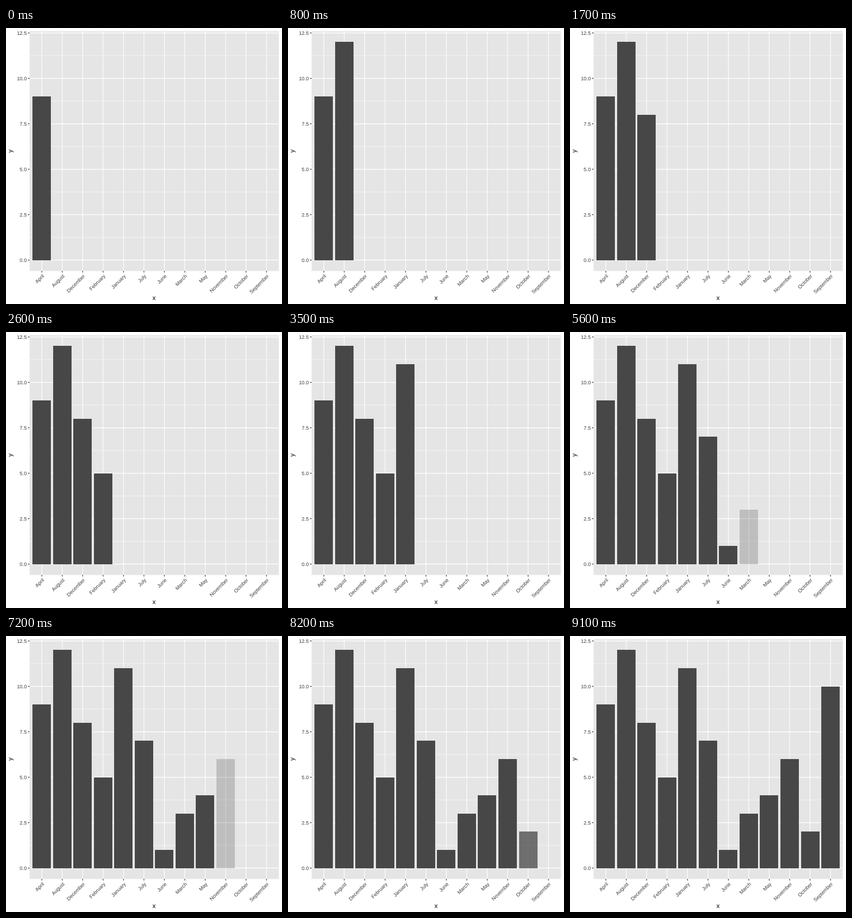
Recreate the animation shown at these times as an HTML page. Size 480x480 px, loop 10 s.

```html
<!DOCTYPE html>
<html lang="en">
<head>
<meta charset="utf-8">
<title>Bars by month</title>
<style>
  html, body { margin: 0; width: 100%; height: 100%; overflow: hidden; background: #fff; }
  svg { display: block; width: 480px; height: 480px; }
  text { font-family: "Liberation Sans", Arial, Helvetica, sans-serif; }
  .label { font-size: 8.8px; fill: #3c3c3c; text-anchor: end; }
  .title { font-size: 11px; fill: #000; text-anchor: middle; }
</style>
</head>
<body>
<svg id="chart" viewBox="0 0 480 480"></svg>
<script>
const LOOP = 10000, STEP = 100;
const LEFT = 41, RIGHT = 474.5, TOP = 5.5, BOTTOM = 422.6;
const UNIT_X = 35.52, UNIT_Y = 31.6, ZERO = 403.6, BAR_WIDTH = 32;

// month, value, time the fade starts, number of fade steps
const months = [
  ["April", 9, 0, 1],
  ["August", 12, 500, 4],
  ["December", 8, 1400, 4],
  ["February", 5, 2300, 4],
  ["January", 11, 3200, 4],
  ["July", 7, 4100, 4],
  ["June", 1, 4900, 3],
  ["March", 3, 5600, 4],
  ["May", 4, 6400, 4],
  ["November", 6, 7200, 4],
  ["October", 2, 8000, 4],
  ["September", 10, 8800, 4]
];

const chart = document.getElementById("chart");
const xAt = i => LEFT + (i + 0.6) * UNIT_X;
const yAt = v => ZERO - v * UNIT_Y;

function add(tag, attrs, content) {
  const node = document.createElementNS("http://www.w3.org/2000/svg", tag);
  for (const key in attrs) node.setAttribute(key, attrs[key]);
  if (content) node.textContent = content;
  return chart.appendChild(node);
}

function line(x1, y1, x2, y2, stroke, width) {
  add("line", { x1, y1, x2, y2, stroke, "stroke-width": width });
}

function rect(x, y, width, height, fill) {
  return add("rect", { x, y, width, height, fill });
}

function text(kind, content, x, y, angle) {
  add("text", { class: kind, transform: `translate(${x} ${y}) rotate(${angle})` }, content);
}

// panel and grid
rect(LEFT, TOP, RIGHT - LEFT, BOTTOM - TOP, "#e5e5e5");
for (let v = 1.25; v < 12.5; v += 2.5) line(LEFT, yAt(v), RIGHT, yAt(v), "#fff", 0.53);
for (let v = 0; v <= 12.5; v += 2.5) line(LEFT, yAt(v), RIGHT, yAt(v), "#fff", 1.07);
months.forEach((m, i) => line(xAt(i), TOP, xAt(i), BOTTOM, "#fff", 1.07));

// bars
const bars = months.map(([, value], i) => {
  const x = Math.round(xAt(i) - 0.45 * UNIT_X);
  const y = Math.round(yAt(value));
  return rect(x, y, BAR_WIDTH, Math.round(ZERO) - y, "#474747");
});

// axes
for (let v = 0; v <= 12.5; v += 2.5) {
  line(LEFT - 2.75, yAt(v), LEFT, yAt(v), "#242424", 1.07);
  text("label", v.toFixed(1), 36.05, yAt(v) + 3.15, 0);
}
months.forEach(([name], i) => {
  line(xAt(i), BOTTOM, xAt(i), BOTTOM + 2.75, "#242424", 1.07);
  text("label", name, xAt(i) + 4.5, 432.1, -45);
});
text("title", "x", 257.6, 472.8, 0);
text("title", "y", 11.2, 214, -90);

function draw(time) {
  const t = time % LOOP;
  months.forEach(([, , start, steps], i) => {
    const step = Math.floor((t - start) / STEP) + 1;
    bars[i].setAttribute("opacity", Math.max(0, Math.min(1, step / steps)));
  });
}

const begin = performance.now();
function tick() {
  draw(performance.now() - begin);
  requestAnimationFrame(tick);
}
tick();
</script>
</body>
</html>
```
